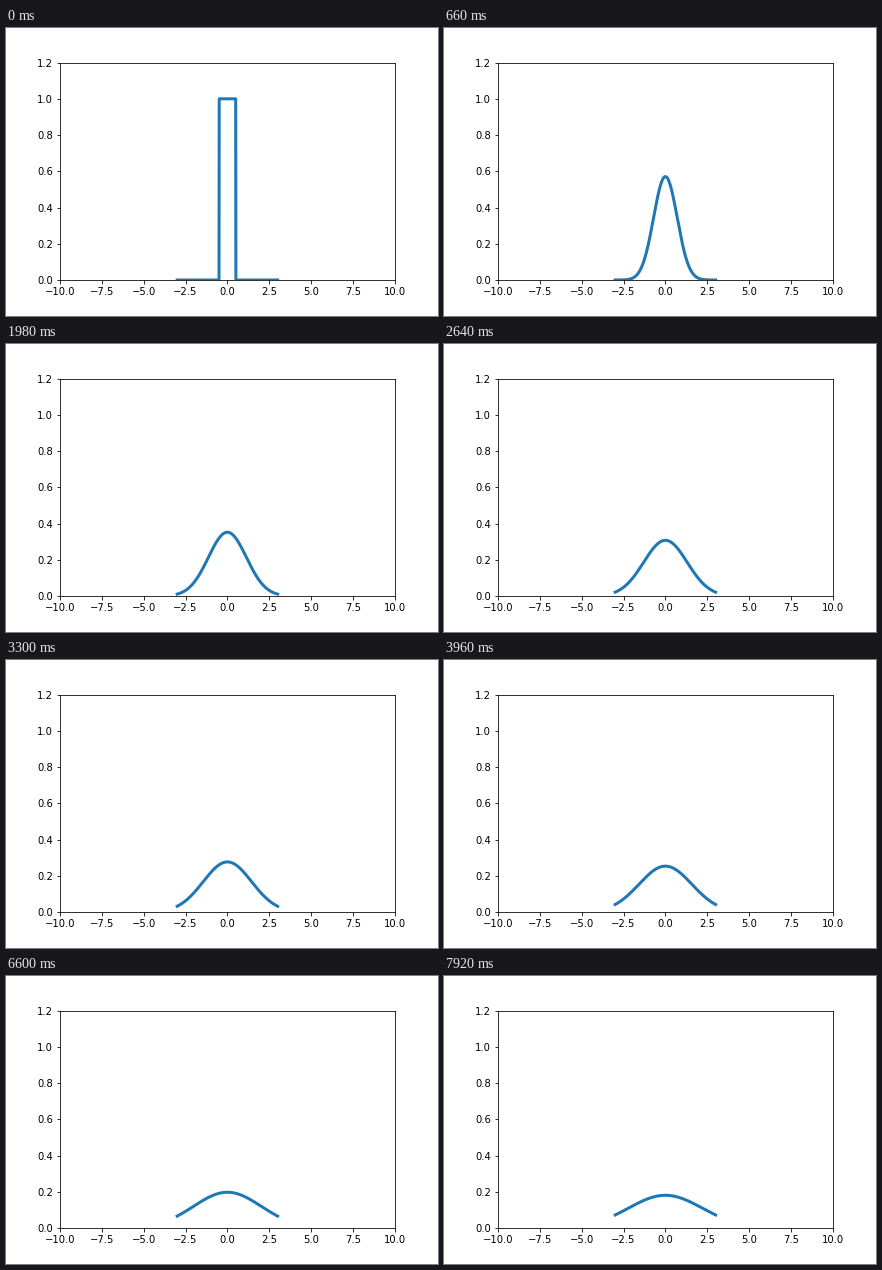
These frames come from a looping animation (432x288 px, 8000 ms). A matplotlib script:

```python
import math

import matplotlib.pyplot as plt
import numpy as np
from matplotlib.animation import FuncAnimation

LOOP_MS = 8000
TICK_MS = 20        # drawing interval
STEP_MS = 330       # time between solution steps
DT = 0.1            # diffusion time per step
HALF_WIDTH = 0.5

erf = np.vectorize(math.erf)
x = np.linspace(-3, 3, 1000)


def heat(t):
    """Unit box diffusing freely on the line, with diffusivity 1."""
    if t == 0:
        return (np.abs(x) < HALF_WIDTH).astype(float)
    spread = math.sqrt(4 * t)
    return 0.5 * (erf((x + HALF_WIDTH) / spread) - erf((x - HALF_WIDTH) / spread))


curves = [heat(n * DT) for n in range(LOOP_MS // STEP_MS + 1)]

fig = plt.figure(figsize=(6, 4), dpi=72, facecolor="white")
fig.subplots_adjust(left=0.125, right=0.9, bottom=0.125, top=0.88)
ax = fig.add_subplot()
ax.set_xlim(-10, 10)
ax.set_ylim(0, 1.2)
line, = ax.plot(x, curves[0], color="#1f77b4", lw=3)


def update(i):
    # round each step change to the nearest tick
    step = (i * TICK_MS + TICK_MS // 2) // STEP_MS
    line.set_ydata(curves[step])
    return line,


anim = FuncAnimation(fig, update, frames=LOOP_MS // TICK_MS, interval=TICK_MS,
                     init_func=lambda: update(0), repeat=True, repeat_delay=0)
plt.show()
```
